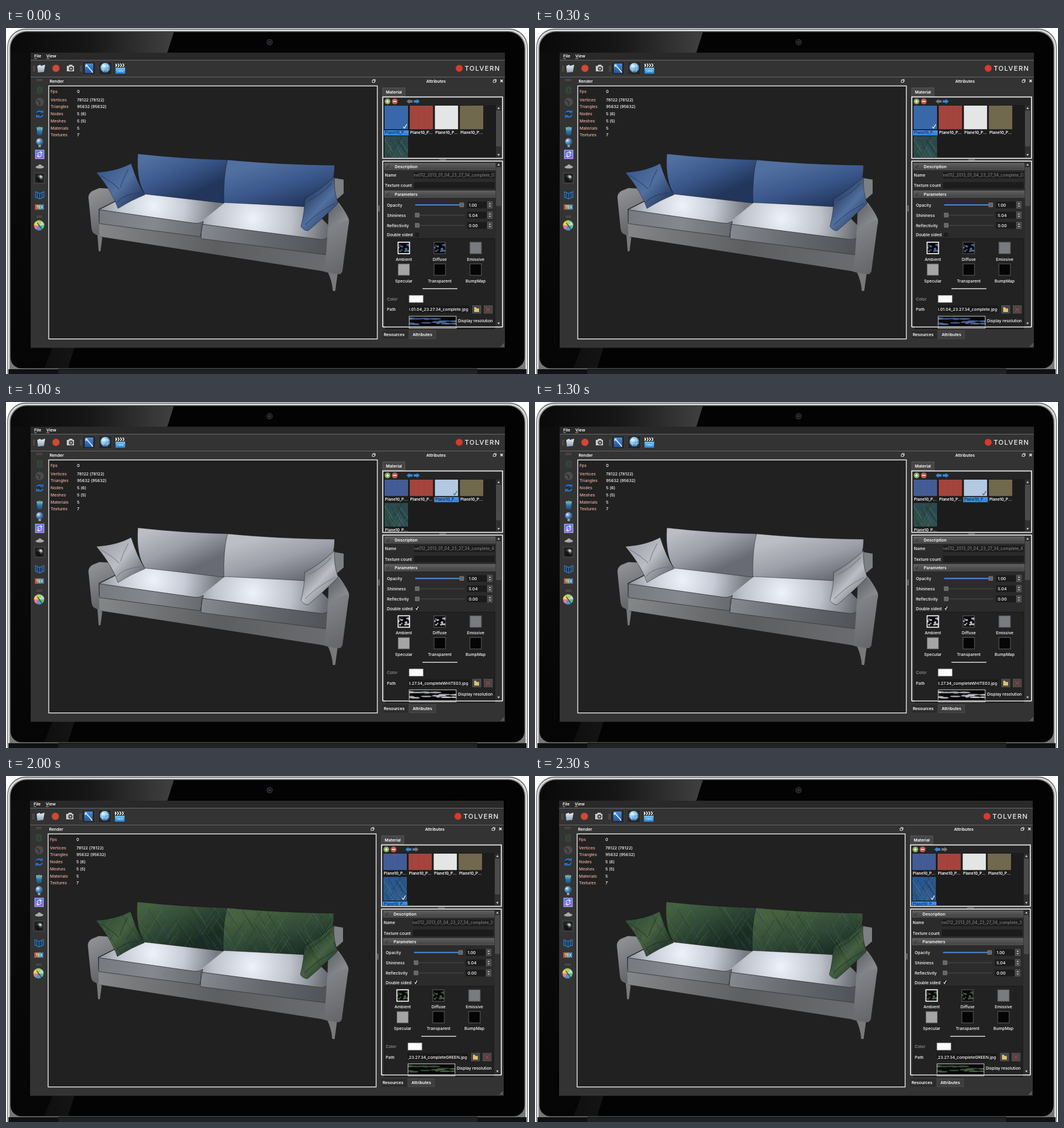
Recreate the animation shown at these times as an HTML page with a canvas. Size 869 by 575 pixels, loop 2.5 s.

```html
<!DOCTYPE html>
<html lang="en">
<head>
<meta charset="utf-8">
<title>Sofa material viewer</title>
<style>
html, body { margin: 0; width: 869px; height: 575px; overflow: hidden; background: #fff; }
canvas { display: block; }
</style>
</head>
<body>
<canvas id="stage" width="869" height="575"></canvas>
<script>
const ctx = document.getElementById('stage').getContext('2d');
const STEP = 500;

// swatch colour, swatch colour when selected, cushion light / mid / dark
const MATERIALS = [
  { swatch: '#465f9b', picked: '#3a6cae', tones: ['#51709f', '#3b588c', '#22365c'] },
  { swatch: '#a9473f', picked: '#7d5871', tones: ['#b85049', '#9c3e3a', '#5b2423'] },
  { swatch: '#e3e6e5', picked: '#b3c8e1', tones: ['#bcbec4', '#9c9fa8', '#686b74'] },
  { swatch: '#746c51', picked: '#586d7b', tones: ['#77705c', '#5f5847', '#393429'], weave: true },
  { swatch: '#2b4a49', picked: '#285791', tones: ['#45613f', '#304a35', '#1b2d23'], hatch: true },
];
const same = x => x, left = x => x - 1, right = x => x - 2;
const STATES = [
  { mat: 0, L: same, R: same, edge: [41, 829], dy: 0, scroll: 0, back: false, next: true, name: '0', file: '' },
  { mat: 1, L: x => 41 + (x - 41) * .98, R: x => 626 + (x - 625) * 1.013, edge: [41, 831], dy: -.3, scroll: 0,
    back: true, next: true, name: '1', file: 'RED', wide: true },
  { mat: 2, L: same, R: same, edge: [41, 829], dy: -.7, scroll: 12, back: true, next: true, name: '4', file: 'WHITE03', both: true },
  { mat: 3, L: left, R: right, edge: [40, 827], dy: .4, scroll: 12, back: true, next: true, name: '2', file: 'BEIGE', both: true },
  { mat: 4, L: left, R: right, edge: [40, 827], dy: -.7, scroll: 12, back: true, next: false, name: '3', file: 'GREEN', both: true },
];

const FRONT = {
  rear: 'M543 249L561 252V275L546 288Z',
  legs: 'M152 345L160 348 157 371H154ZM534 404L551 408 547 437H543Q542 420 534 404Z',
  base: 'M150 322L324 346 535 374 556 409 Q540 409 526 404L152 346Z',
  armL: 'M137 282Q137 275 143 271L155 266 192 268 186 285 154 301 155 346 147 342Q143 340 142 332Z',
  armR: 'M550 287Q562 301 569 316Q571 321 569 328L559 404Q557 410 551 409L530 403 535 330Z',
  armTop: 'M549 290Q564 303 569 319Q553 323 535 335L536 304Z',
  seatL: 'M155 302L215 272 366 289 328 323Q322 327 310 325Z',
  seatR: 'M325 326Q323 321 329 318L365 289 505 297 538 330 536 350Q532 354 520 352Z',
  edgeL: 'M155 302L310 324Q322 326 328 321L323 347 155 325Z',
  edgeR: 'M325 326L520 351Q530 353 536 347L533 377 324 350Z',
  backL: 'M219 209Q290 217 368 219Q368 258 362 291L231 276Q216 255 219 209Z',
  backR: 'M368 219Q450 227 546 228Q546 255 536 265L499 297 362 290Q361 247 368 219Z',
  pillowL: 'M150 240Q184 238 208 225Q218 257 231 277Q208 286 186 300Q178 274 150 240Z',
  pillowR: 'M546 247Q544 271 552 291Q525 318 502 337Q495 337 490 330Q497 303 496 283Q521 270 546 247Z',
  folds: 'M157 245Q178 257 188 268M203 235Q195 250 190 265M184 291Q193 277 222 274M541 258Q525 276 503 287M547 291Q518 306 497 327',
  glows: [245, 295, 410, 317], box: [145, 205, 430, 140],
};
const TURNED = {
  rear: 'M561 235L578 239 573 272 562 290ZM206 191L214 187V211L206 207Z',
  legs: 'M154 334L165 337 161 356H158ZM541 418L554 422 547 445H543Q545 430 541 418Z',
  base: 'M153 312L331 352 549 394 576 427Q560 427 546 421L155 337Z',
  armL: 'M132 269Q133 264 140 261L155 256 190 262 184 280 154 297 158 337 150 333Q146 328 144 320Z',
  armR: 'M568 300Q579 321 586 343Q587 349 585 358L577 422Q576 429 569 427L544 420 551 354Z',
  armTop: 'M567 303Q580 324 586 347Q568 346 550 358L545 344Z',
  seatL: 'M155 295L217 247 372 269 337 328Q331 334 321 331Z',
  seatR: 'M332 334Q330 329 336 322L369 270 514 288 557 345 550 374Q546 378 535 375Z',
  edgeL: 'M155 295L321 330Q331 333 337 326L330 354 156 318Z',
  edgeR: 'M332 334L535 374Q545 376 550 371L545 400 331 355Z',
  backL: 'M214 175Q290 190 373 195Q374 234 368 272L229 250Q211 222 214 175Z',
  backR: 'M373 195Q460 210 564 216Q565 241 555 251L512 291 368 271Q367 224 373 195Z',
  pillowL: 'M142 237Q178 221 203 196Q214 228 230 248Q207 267 185 295Q171 263 142 237Z',
  pillowR: 'M566 246Q563 280 571 306Q557 332 542 352Q519 351 502 355Q511 318 508 287Q541 274 566 246Z',
  folds: 'M151 237Q176 243 187 257M199 207Q192 226 189 254M186 284Q190 263 222 249M561 258Q542 285 516 292M568 306Q532 314 508 346',
  glows: [250, 282, 412, 309], box: [140, 173, 440, 190],
};

let X = same;

function box(x, y, w, h, fill, stroke, lw = 1) {
  const a = X(x), width = X(x + w) - a;
  if (fill) { ctx.fillStyle = fill; ctx.fillRect(a, y, width, h); }
  if (stroke) { ctx.strokeStyle = stroke; ctx.lineWidth = lw; ctx.strokeRect(a, y, width, h); }
}
function text(str, x, y, color = '#eee', align = 'left', weight = 500, size = 6.8) {
  ctx.font = `${weight} ${size}px Inter, sans-serif`;
  ctx.textAlign = align;
  ctx.textBaseline = 'middle';
  ctx.fillStyle = color;
  ctx.fillText(str, X(x), y + .5);
}
function disc(x, y, r, fill) {
  ctx.fillStyle = fill;
  ctx.beginPath(); ctx.arc(X(x), y, r, 0, 7); ctx.fill();
}
function shape(d, fill, stroke, lw = 1) {
  const p = new Path2D(d);
  if (fill) { ctx.fillStyle = fill; ctx.fill(p); }
  if (stroke) { ctx.strokeStyle = stroke; ctx.lineWidth = lw; ctx.stroke(p); }
}
// path given relative to a mapped point
function icon(x, y, d, fill, stroke, lw) {
  ctx.save(); ctx.translate(X(x), y); shape(d, fill, stroke, lw); ctx.restore();
}
function clipped(x, y, w, h, draw) {
  ctx.save(); ctx.beginPath(); ctx.rect(X(x), y, X(x + w) - X(x), h); ctx.clip(); draw(); ctx.restore();
}
function blend(g, colors) {
  colors.forEach((c, i) => g.addColorStop(i / (colors.length - 1), c));
  return g;
}
const linear = (x0, y0, x1, y1, ...colors) => blend(ctx.createLinearGradient(x0, y0, x1, y1), colors);
const radial = (x, y, r, ...colors) => blend(ctx.createRadialGradient(x, y, 0, x, y, r), colors);
function seeded(seed) {
  return () => (seed = seed * 16807 % 2147483647) / 2147483647;
}

function fabric(mat, x, y, w, h, fine) {
  const rnd = seeded(77);
  const stroke = (color, x0, y0, x1, y1) => {
    ctx.strokeStyle = color;
    ctx.beginPath(); ctx.moveTo(x0, y0); ctx.lineTo(x1, y1); ctx.stroke();
  };
  ctx.lineWidth = .7;
  if (mat.weave) {
    for (let i = 0; i < h; i += 2) stroke('#211d1438', x, y + i, x + w, y + i + w * .08);
    for (let i = 0; i < w; i += 3) stroke('#b6a77a30', x + i, y, x + i - 4, y + h);
  } else if (mat.hatch) {
    const colors = ['#6b955070', '#364c8290', '#10201b80', '#50798a60'];
    for (let i = 0; i < w * (fine ? 1.6 : .7); i++) {
      const a = x + rnd() * w, b = y + rnd() * h, len = fine ? 20 : 32, dir = rnd() < .65 ? 1 : -1;
      stroke(colors[i % 4], a, b, a + len * dir * .65, b + len);
    }
  }
}

function laptop() {
  ctx.fillStyle = '#fff'; ctx.fillRect(0, 0, 869, 575);
  const shell = (x, y, w, h, r, fill) => {
    ctx.fillStyle = fill; ctx.beginPath(); ctx.roundRect(x, y, w, h, r); ctx.fill();
  };
  shell(2, 1, 865, 600, 31, '#595b5c');
  shell(3, 2.5, 863, 600, 30, '#d8dada');
  shell(6, 5, 857, 600, 28, '#777');
  shell(7.5, 6.5, 854, 559, [27, 27, 18, 18], '#030303');
  ctx.save();
  ctx.beginPath(); ctx.roundRect(8, 7, 853, 558, [27, 27, 18, 18]); ctx.clip();
  shape('M0 0H281L268 41 100 575H0Z', linear(0, 0, 280, 0, '#080808', '#171717', '#414141'));
  shape('M0 41H268L60 575H0Z', linear(0, 41, 0, 565, '#0d0d0d', '#050505'));
  ctx.restore();
  ctx.fillStyle = '#101112'; ctx.fillRect(4, 567, 861, 8);
  ctx.fillStyle = '#363839'; ctx.fillRect(87, 566, 696, 1);
  ctx.fillStyle = '#202223'; ctx.fillRect(87, 568, 696, 7);
  X = same;
  disc(438, 23.5, 5.2, '#2e2f32'); disc(438, 23.5, 3.7, '#14161a'); disc(438, 23.5, 1.7, '#363b46');
}

function grip(x, y, wide) {
  for (let i = 0; i < 10; i++)
    box(x + (wide ? i % 5 * 2 : i % 2 * 2), y + (wide ? (i / 5 | 0) * 2 : (i / 2 | 0) * 2), 1, 1, '#777');
}

function toolbar(s) {
  X = s.L;
  text('File', 47, 46.5, '#fff', 'left', 600);
  text('View', 67, 46.5, '#fff', 'left', 600);
  box(47, 50.5, 4, .7, '#ddd'); box(67, 50.5, 5, .7, '#ddd');
  grip(45, 63); grip(123, 63);
  icon(58, 67, 'M-6 -4L-1 -6 0 -4 7 -6 5 6 -5 7Z', linear(0, -6, 0, 7, '#e6edf5', '#8da0b5'));
  disc(83, 67, 6, '#cf4936');
  icon(107, 67, 'M-6 -4H-3L-2 -6H3L4 -4H6V5H-6Z', '#c9cbc9');
  disc(108, 67.5, 3.5, '#3c4144'); disc(108, 67.5, 1.7, '#a6aaa9');
  box(127, 56, 22, 22, '#272727', '#454545');
  box(131, 59, 14, 16, linear(0, 58, 0, 76, '#4d91df', '#1c4f9d'));
  icon(138, 67, 'M-5 -6L4 4M4 4L6 7M-6 -3L-3 -6', null, '#e4ecf4', 1.8);
  box(154, 56, 22, 22, '#272727', '#454545');
  disc(165, 66, 8, radial(X(163), 63, 9, '#e5f6ff', '#8cc4e9', '#3e86c6'));
  icon(165, 66, 'M-7 -2Q0 -5 7 -2M-7 2Q0 6 7 2M-3 -7Q-6 0 -3 7M3 -7Q6 0 3 7', null, '#ffffffa0', .8);
  box(182, 66, 16, 10, linear(0, 66, 0, 76, '#77c3f6', '#2680ce'));
  box(182, 59, 16, 6, '#e7e7e7');
  for (let i = 0; i < 4; i++) icon(183 + i * 4, 59, 'M0 0H2L4 3 2 6H0L2 3Z', '#222');
  text('VIEW', 190, 71, '#bce4ff', 'center', 600, 4);
  X = s.R;
  disc(753, 67, 5.8, '#d83a2c');
  ctx.letterSpacing = '1.25px';
  text('TOLVERN', 762, 67, '#f2f2f2', 'left', 500, 11);
  ctx.letterSpacing = '0px';
}

function sidebar(s) {
  X = s.L;
  grip(51, 85, true); grip(51, 312, true);
  icon(56, 103, 'M-6 -6L-1 -2 -1 2 -6 6 -4 0ZM6 -6L1 -2V2L6 6 4 0ZM-4 -6H4L0 -2ZM-4 6H4L0 2Z', '#36483a');
  disc(56, 123, 7, '#4b4b4b'); icon(56, 123, 'M-4 -3L0 0V5', null, '#222', 1.2);
  icon(56, 143, 'M-6 -2Q-3 -8 4 -5L6 -7V-1H0L2 -3Q-3 -5 -4 -1ZM6 2Q3 8 -4 5L-6 7V1H0L-2 3Q3 5 4 1Z', '#2774c7');
  text('90°', 56, 142.5, '#15253a', 'center', 700, 6.5);
  icon(56, 171, 'M-5 -6H5L4 6Q0 9 -4 6Z', linear(0, -6, 0, 7, '#8ccbe9', '#2e78ad', '#24527c'));
  icon(56, 166, 'M-4 0Q0 -4 4 0Q0 3 -4 0', '#6ba37f');
  disc(56, 189, 6, radial(X(54), 187, 7, '#dff0ff', '#6797c7', '#315f94'));
  box(54, 194, 4, 4, '#8d9cac');
  box(49, 203, 14, 14, linear(0, 203, 0, 217, '#4676f0', '#8a5de2'), '#c0c9ff');
  icon(56, 210, 'M-4 0Q-2 -5 3 -3M4 0Q2 5 -3 3M1 -5L4 -3 1 0M-1 5L-4 3 -1 0', null, '#e8edff', 1.2);
  icon(56, 230, 'M-7 2Q-6 -1 -3 -1Q0 -6 4 -1Q7 -1 7 2Q0 5 -7 2Z', '#aaa');
  box(47, 241, 17, 17, '#222', '#505050');
  disc(56, 250, 6, radial(X(58), 247, 8, '#f0f4f5', '#39434a', '#080808'));
  disc(54, 251, 2.5, '#1b1612');
  icon(56, 277, 'M-7 -5L0 -2 7 -5V4L0 7 -7 4ZM0 -2V7M-4 -4V5M4 -4V5', '#173250', '#397bb8', 1.2);
  ['#c85048', '#4f9b60', '#4970c4'].forEach((c, i) => box(48 + i * 5, 293, 5, 9, c));
  text('TEX', 56, 297.5, '#e9e9df', 'center', 700, 6);
  const wheel = ['#52c477', '#4f93d6', '#e5799a', '#eed05a', '#a6d75a', '#bed7cc'];
  wheel.forEach((c, i) => {
    ctx.fillStyle = c;
    ctx.beginPath(); ctx.moveTo(X(55), 328); ctx.arc(X(55), 328, 8.5, i * 1.047, (i + 1) * 1.047); ctx.fill();
  });
  icon(60, 332, 'M-8 -8L2 5', null, '#333', 1.2);
}

function sofa(s) {
  const g = s.mat === 1 ? TURNED : FRONT, mat = MATERIALS[s.mat], [hi, mid, low] = mat.tones;
  const turned = g === TURNED, [gx, gy, hx, hy] = g.glows, [bx, by, bw, bh] = g.box;
  ctx.save();
  if (!turned) ctx.translate(s.L(0), 0);
  shape(g.rear, '#7c7f83');
  shape(g.legs, '#77797b');
  shape(g.base, linear(150, 330, 550, 410, '#858789', turned ? '#808489' : '#5c5e60', '#6b6d70'));
  shape(g.armL, linear(137, 280, 165, 330, turned ? '#aaafb5' : '#8d8f92', '#66686b'));
  shape(g.seatL, radial(gx, gy, 105, '#eef2fa', turned ? '#c5ccd6' : '#c6cbd5', '#777b82'));
  shape(g.seatR, radial(hx, hy, 130, '#eef2fa', turned ? '#c5ccd6' : '#bdc2cb', '#62666b'));
  shape(g.edgeL, linear(160, 305, 330, 340, '#777b80', turned ? '#959ca5' : '#85898f', '#65686c'));
  shape(g.edgeR, linear(325, 330, 535, 375, '#858990', turned ? '#858c96' : '#65686c', '#4f5256'));
  shape(g.edgeL, null, '#393b3e', .9); shape(g.edgeR, null, '#393b3e', .9);
  for (const part of ['backL', 'backR', 'pillowL', 'pillowR']) {
    if (part === 'pillowR') {
      shape(g.armR, linear(535, 320, 580, 400, turned ? '#a4a9af' : '#85878b', turned ? '#858a90' : '#626467'));
      shape(g.armTop, linear(540, 300, 570, 330, '#66696e', turned ? '#b4bac1' : '#95989d'));
    }
    const pillow = part.startsWith('pillow');
    const top = turned ? 180 : 212;
    const fill = pillow
      ? part === 'pillowL' ? linear(160, top + 20, 224, top + 78, mid, hi, low)
        : linear(495, top + 60, 550, top + 110, low, hi, low)
      : part === 'backL' ? linear(245, top, 280, top + 78, hi, mid, low)
        : linear(430, top + 10, 455, top + 95, hi, mid, low);
    shape(g[part], fill);
    ctx.save(); ctx.clip(new Path2D(g[part])); fabric(mat, bx, by, bw, bh); ctx.restore();
    shape(g[part], null, '#1119', .8);
  }
  shape(g.folds, null, low + '99', 1.3);
  ctx.restore();
}

function viewport(s) {
  X = s.L;
  text('Render', 72.5, 88.5, '#fff', 'left', 600);
  const x0 = s.L(71), x1 = s.R(617);
  X = same;
  ctx.fillStyle = '#212121'; ctx.fillRect(x0, 96, x1 - x0, 421);
  sofa(s);
  box(x0, 96.3, x1 - x0, 420.4, null, '#e7e7e7', 1.4);
  X = s.L;
  const stats = [['Fps', '0', 105], ['Vertices', '78122 (78122)', 119], ['Triangles', '95632 (95632)', 130.7], ['Nodes', '5 (6)', 142.5],
    ['Meshes', '5 (5)', 154.2], ['Materials', '5', 166], ['Textures', '7', 177.5]];
  for (const [key, value, y] of stats) {
    text(key, 74, y, '#edb0a3');
    text(value, 118, y, '#fff');
  }
  X = s.R;
  windowIcon(611, 88);
  box(619, 295, 1.5, 10, '#888');
}

function windowIcon(x, y) {
  icon(x, y, 'M-2.5 -1H1.5V2.5H-2.5ZM-1 -1V-2.5H2.5V1H1.5', null, '#ddd', .9);
}

function scrollbar(x, y, h, thumb) {
  box(x, y, 9, h, '#303030');
  box(x + 1, y + 9, 7, thumb, '#4a4a4a', '#626262', .6);
  icon(x + 4.5, y + 4, 'M-2 1.5L0 -1.5 2 1.5Z', '#ddd');
  icon(x + 4.5, y + h - 4, 'M-2 -1.5L0 1.5 2 -1.5Z', '#ddd');
}

function materials(s) {
  box(626, 99.5, 37, 14, '#454545', '#656565', .7);
  text('Material', 644.5, 106, '#fff', 'center', 600);
  box(626, 114.6, 199, 102, '#252525', '#e9e9e9', 1.7);
  disc(634, 122, 4.8, '#86a75a'); icon(634, 122, 'M-2.5 0H2.5M0 -2.5V2.5', null, '#f5f5e5', 1.5);
  disc(646, 122, 4.8, '#d05a50'); icon(646, 122, 'M-2.7 0H2.7', null, '#fff', 1.7);
  icon(670.5, 122, 'M5 -2H0V-4L-5 0 0 4V2H5Z', s.back ? '#3986d4' : '#777');
  icon(682.5, 122, 'M-5 -2H0V-4L5 0 0 4V2H-5Z', s.next ? '#3986d4' : '#777');
  box(628, 128, 186, 87, '#1c1c1c');
  clipped(628, 129, s.wide ? 196 : 186, 86, () => MATERIALS.forEach((mat, i) => {
    const row = !s.wide && i > 3 ? 1 : 0;
    const x = 629 + (row ? 0 : i) * (s.wide ? 40 : 41.7), y = 129 + row * 50.5 - s.scroll, on = i === s.mat;
    clipped(x, y, 39, 39.5, () => {
      box(x, y, 39, 39.5, on ? mat.picked : mat.swatch);
      fabric(mat, X(x), y, 40, 40, true);
      if (i < 2) for (let k = 0; k < 40; k += 2) box(x + k, y, .5, 40, '#0002');
    });
    if (on) {
      icon(x + 34, y + 35, 'M-3 0L-1 2.5 3 -4', null, i === 2 ? '#555' : '#fff', 1.2);
      box(x - 1, y + 41, 41, 8.5, '#3d8fe6');
    }
    text('Plane10_P...', x + 19.5, y + 45, on ? '#122c50' : '#fff', 'center', 600, 6.5);
  }));
  if (s.wide) {
    box(628, 206, 195, 9, '#303030');
    box(637, 207, 160, 7, '#444', '#626262', .6);
    icon(632, 210.5, 'M1.5 -2L-1.5 0 1.5 2Z', '#ddd'); icon(819, 210.5, 'M-1.5 -2L1.5 0 -1.5 2Z', '#ddd');
  } else scrollbar(814, 129, 86, 58);
  box(720, 218.5, 11, 1, '#999');
}

function thumbnail(mat, x, y, w, h, blobs, seed) {
  const rnd = seeded(seed);
  box(x, y, w, h, '#080808');
  clipped(x, y, w, h, () => {
    for (let i = 0; i < blobs; i++) {
      ctx.fillStyle = mat.tones[i % 2];
      ctx.beginPath();
      ctx.ellipse(X(x + rnd() * w), y + h * (.2 + rnd() * .65), w * (.04 + rnd() * .1), h * .08, 0, 0, 7);
      ctx.fill();
    }
  });
}

function header(label, y) {
  box(629, y, 184, 11, linear(0, y, 0, y + 11, '#606060', '#424242'), '#6b6b6b', .6);
  icon(634, y + 6, 'M-2 -1L0 2 3 -3', null, '#292929', .9);
  text(label, 646, y + 5.7, '#fff', 'left', 600);
}

function slider(label, y, value, t) {
  text(label, 633, y, '#fff');
  box(680, y - 1, 82, 2, '#3c3c3c');
  if (t) box(680, y - 1, 76, 2, '#4b88d3');
  box(680 + t * 74, y - 3.3, 6.5, 6.5, '#666', '#888', .7);
  box(766, y - 5.5, 33, 11, '#1b1b1b');
  text(value, 769, y, '#fff');
  box(800, y - 5.5, 8, 11, '#4a4a4a', '#686868', .6);
  icon(804, y, 'M-1.7 -1.2L0 -3.2 1.7 -1.2ZM-1.7 1.2L0 3.2 1.7 1.2Z', '#ddd');
}

function properties(s) {
  const mat = MATERIALS[s.mat];
  box(626, 221.2, 199, 275, '#2b2b2b', '#e9e9e9', 1.7);
  ctx.save();
  ctx.translate(0, s.dy);
  header('Description', 224.5);
  text('Name', 629.5, 244.5, '#fff');
  box(678, 239, 134, 11, '#1c1c1c');
  clipped(678, 239, 134, 11, () => text(`Plane012_2013_01_04_23_27_34_complete_${s.name}`, 811, 244.5, '#8d8d8d', 'right', 400, 6.9));
  text('Texture count', 629.5, 261.7, '#fff');
  box(678, 256, 134, 11, '#1c1c1c');
  header('Parameters', 270.5);
  slider('Opacity', 294, '1.00', 1);
  slider('Shininess', 311, '5.04', 0);
  slider('Reflectivity', 328, '0.00', 0);
  text('Double sided', 633, 343.7, '#fff');
  box(679, 339.5, 8, 8, '#1d1d1d', '#353535', .6);
  if (s.both) icon(683, 343.5, 'M-2 0L-.5 2.2 2.2 -3', null, '#fff', 1.1);
  box(631, 350, 181, 150, '#222', '#171717');

  const maps = ['Ambient', 'Diffuse', 'Emissive', 'Specular', 'Transparent', 'BumpMap'];
  maps.forEach((label, i) => {
    const cx = 661 + i % 3 * 59.7, y = i < 3 ? 356 : 392;
    if (i < 2) thumbnail(mat, cx - 9.5, y, 19, 19, 17, 41);
    else box(cx - 9.5, y, 19, 19, ['#787b80', '#a5a5a5', '#050505', '#050505'][i - 2]);
    box(cx - 9.5, y, 19, 19, null, i ? '#5c5c5c' : '#f3f3f3', i ? 1 : 1.7);
    text(label, cx, y + 28, '#fff', 'center');
  });
  box(692, 432.6, 58, 1.3, '#eee');
  text('Color', 633, 450.5, '#999');
  box(670, 444.5, 23, 11.5, '#fbfbfb', '#bbb', .8);
  text('Path', 633, 467.8, '#fff');
  box(669, 461.5, 101, 12, '#191919');
  clipped(670, 461, 100, 13, () => text(`2013.01.04_23.27.34_complete${s.file}.jpg`, 768, 467.8, '#fff', 'right'));
  box(775.5, 461.5, 13.5, 12.5, '#454545', '#686868', .7);
  icon(782, 468, 'M-4 -4H-1L0 -2H4V4H-4Z', '#dfc26b');
  box(794.5, 461.5, 13.5, 12.5, '#454545', '#686868', .7);
  icon(801, 468, 'M-3.5 -3.5L3.5 3.5M3.5 -3.5L-3.5 3.5', null, '#b83d34', 1.3);
  text('Display resolution', 751, 486, '#fff');
  thumbnail(mat, 670, 479, 78, 17, 20, 913);
  box(670, 479, 78, 20, null, '#ddd', .9);
  ctx.restore();
  box(627, 495, 197, 1, '#2b2b2b');
  box(626, 496.2, 199, 1.4, '#e9e9e9');
  scrollbar(814, 223, 272, 63);
}

function draw(s) {
  laptop();
  const [x0, x1] = s.edge;
  box(x0, 41, x1 - x0, 490.5, '#333');
  box(x0, 41, x1 - x0, 12, '#292929');
  box(x0, 53, x1 - x0, 1, '#686868');
  box(x0, 81, x1 - x0, 1, '#656565');
  toolbar(s);
  sidebar(s);
  viewport(s);
  X = s.R;
  text('Attributes', 714.5, 88.5, '#fff', 'center', 600);
  windowIcon(812, 88);
  icon(823.5, 88, 'M-2 -2L2 2M2 -2L-2 2', null, '#eee', 1.4);
  materials(s);
  properties(s);
  box(626, 503, 42, 13, '#2b2b2b');
  box(670, 503, 44, 13.5, '#3e3e3e', '#555', .6);
  text('Resources', 645, 509.5, '#fff', 'center', 600);
  text('Attributes', 692, 509.5, '#fff', 'center', 600);
  icon(828, 530, 'M-6 0L0 -6M-4 0L0 -4M-2 0L0 -2', null, '#999', .7);
}

let shown = -1;
const start = performance.now();
function tick() {
  const index = Math.floor((performance.now() - start) / STEP) % STATES.length;
  if (index !== shown) draw(STATES[shown = index]);
  requestAnimationFrame(tick);
}
tick();
</script>
</body>
</html>
```
